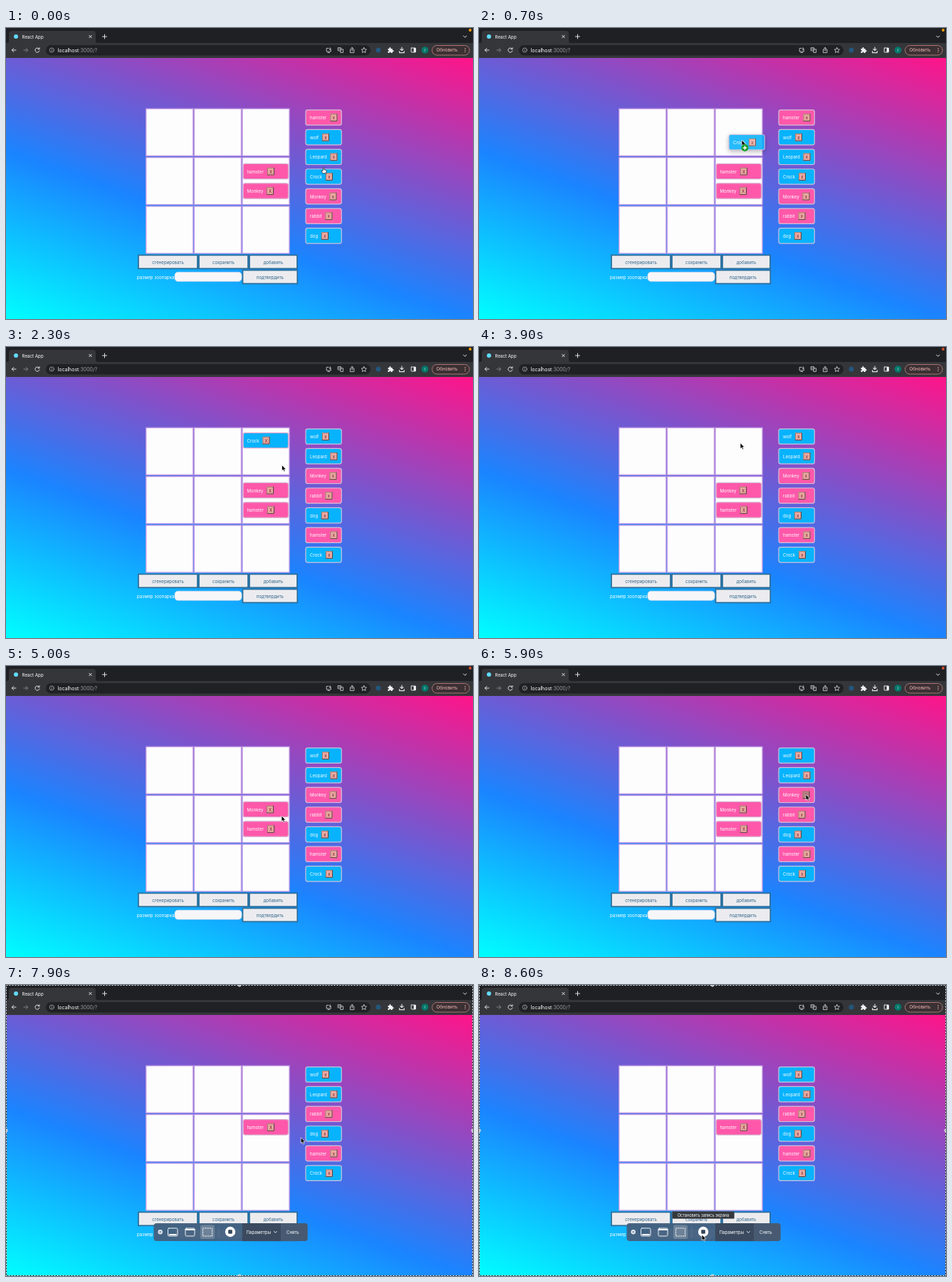
Write an HTML page that moves like this. It is 656 px wide and 408 px high and loops after 8700 ms.

```html
<!DOCTYPE html>
<html lang="ru">
<head>
<meta charset="utf-8">
<title>React App</title>
<style>
html, body { margin: 0; width: 100%; height: 100%; overflow: hidden; background: #35363a; }
#stage { position: relative; width: 656px; height: 408px; overflow: hidden; }
#page { position: absolute; left: 0; top: 42px; width: 656px; height: 366px;
  background: linear-gradient(20deg, #00ffff 0%, #1a84ff 39%, #ff1489 100%); }
svg { position: absolute; left: 0; top: 0; display: block; }
text { font-family: Inter, sans-serif; font-size: 6.1px; fill: #fff; dominant-baseline: central; }
.mid { text-anchor: middle; }
.line { fill: none; stroke: #dfe1e5; stroke-width: 1; stroke-linecap: round; stroke-linejoin: round; }
</style>
</head>
<body>
<div id="stage">
<div id="page"></div>
<svg width="656" height="408" viewBox="0 0 656 408">
  <g id="chrome">
    <rect width="656" height="42" fill="#35363a"/>
    <rect width="656" height="21" fill="#1f2023"/>
    <path d="M1 21Q4 21 4 18V8Q4 4 8 4H122Q126 4 126 8V18Q126 21 129 21Z" fill="#35363a"/>
    <circle cx="14" cy="12" r="3" fill="#61dafb"/>
    <text x="22.5" y="12" style="font-size:6.2px">React App</text>
    <path class="line" d="M116.8 10.3l3.4 3.4m0-3.4l-3.4 3.4M135.5 12h6m-3-3v6M642.5 11l2.2 2.2 2.2-2.2"/>
    <path class="line" d="M14 31H8.3m2.6-2.6L8.3 31l2.6 2.6"/>
    <path class="line" style="stroke:#7d8085" d="M25 31h5.7m-2.6-2.6l2.6 2.6-2.6 2.6"/>
    <path class="line" d="M46.6 29.3A3.1 3.1 0 1 0 47 32M47 27.7v2h-2"/>
    <rect x="56" y="24" width="456" height="14.5" rx="7.2" fill="#202124"/>
    <g class="line" style="stroke:#b9bcc1;stroke-width:.7">
      <circle cx="64.3" cy="31" r="3.1"/>
      <path d="M64.3 30.8v1.7M64.3 29.2v.1"/>
    </g>
    <text x="72.5" y="31" style="font-size:7px">localhost<tspan fill="#9aa0a6">:3000/?</tspan></text>
    <g class="line" style="stroke:#c6c9ce;stroke-width:.9">
      <path d="M453 28.4h-2.8v4.6h6.2v-2M452 34.5h2.6M455.3 27.6v3m-1.3-1.2l1.3 1.2 1.3-1.2"/>
      <path d="M466.6 27.6h4v4.2h-4zM470.8 29.8h2.8v4.6h-3.8v-2.4M467.6 29.6h2"/>
      <path d="M485 30h-1.5v4.6h5.4V30h-1.5M486.2 32.3v-5m-1.4 1.3l1.4-1.4 1.4 1.4"/>
      <path d="M502.8 27.4l1.1 2.4 2.6.3-1.9 1.8.5 2.6-2.3-1.3-2.3 1.3.5-2.6-1.9-1.8 2.6-.3z"/>
    </g>
    <circle cx="523" cy="31" r="3.5" fill="#24567c"/>
    <path d="M536.5 29h2q-.6-2 1-2t1 2h2.3v2.2q1.8-.6 1.8 1t-1.8 1V35h-2q0-1.5-1.2-1.5T538.500 35h-2v-2.200q1.400 0 1.400-1t-1.400-1z" fill="#f1f3f4"/>
    <path class="line" style="stroke-width:1.2" d="M556 27v4.600m-2.100-2l2.100 2 2.100-2M552.700 32.500v2.200h6.600v-2.200"/>
    <rect class="line" x="569.200" y="28" width="6.200" height="6" rx=".5"/>
    <rect x="572.700" y="28" width="2.800" height="6" fill="#f1f3f4"/>
    <circle cx="588.500" cy="31" r="4.800" fill="#00796b"/>
    <text class="mid" x="588.500" y="31.200" style="font-size:5px">I</text>
    <rect x="598.500" y="24.500" width="52.500" height="13.500" rx="6.700" fill="#3b3033" stroke="#c98480" stroke-width=".8"/>
    <text x="604.500" y="31.200" style="font-size:6.300px;fill:#f2b8b5">Обновить</text>
    <g fill="#f2b8b5"><circle cx="645" cy="28.800" r=".7"/><circle cx="645" cy="31.200" r=".7"/><circle cx="645" cy="33.600" r=".7"/></g>
    <circle id="dot" cx="652" cy="3" r="1.900"/>
  </g>
  <g id="board"></g>
  <g id="cards"></g>
  <g id="recorder">
    <rect x=".5" y=".5" width="655" height="407" fill="none" stroke="#222"/>
    <rect x=".5" y=".5" width="655" height="407" fill="none" stroke="#e4e4e4" stroke-dasharray="2 2"/>
    <g fill="#b8b8b8" stroke="#fff" stroke-width=".6">
      <circle cx="328" cy="0" r="2.200"/><circle cx="328" cy="408" r="2.200"/>
      <circle cx="0" cy="204" r="2.200"/><circle cx="656" cy="204" r="2.200"/>
    </g>
    <rect x="207.500" y="334" width="216" height="25" rx="4" fill="#43607f" fill-opacity=".96"/>
    <path d="M332 334H386V359H332z" fill="#3b4a5f"/>
    <path d="M386 334H419.500Q423.500 334 423.500 338V355Q423.500 359 419.500 359H386z" fill="#485a72"/>
    <rect x="273" y="336.500" width="20" height="19.500" rx="2.500" fill="#6d8299"/>
    <circle cx="216.700" cy="346.300" r="3.200" fill="#e3e8ee"/>
    <path d="M215.500 345.100l2.400 2.400m0-2.400l-2.400 2.400" stroke="#43607f" stroke-width=".9"/>
    <g class="line" style="stroke:#f0f3f6">
      <rect x="227.500" y="341" width="13.500" height="11" rx="1.500"/>
      <path d="M229.500 350h9.500" style="stroke-width:1.800"/>
      <rect x="252" y="341" width="13" height="11" rx="1.500"/>
      <path d="M252.500 343h12" style="stroke-width:2"/>
      <rect x="276.500" y="341" width="13" height="11" stroke-dasharray="1.500 1.700"/>
      <path d="M376.500 345.500l1.900 1.900 1.900-1.900"/>
      <path d="M299 339v15" style="stroke:#637b94;stroke-width:.7"/>
    </g>
    <circle cx="315" cy="346" r="7.200" fill="#fff"/>
    <rect x="312.200" y="343.200" width="5.600" height="5.600" rx="1" fill="#34465a"/>
    <text x="337.500" y="346.500">Параметры</text>
    <text x="394" y="346.500">Снять</text>
    <g id="tip">
      <rect x="271.500" y="317.500" width="87" height="10" rx="1" fill="#35383d" stroke="#5d6168" stroke-width=".5"/>
      <text class="mid" x="315" y="322.600" style="font-size:5.500px">Остановить запись экрана</text>
    </g>
  </g>
  <g id="cursor">
    <path id="arrow" d="M0 0V8L1.900 6.400 3.200 9.300 4.600 8.700 3.400 5.900H5.900Z" fill="#000" stroke="#fff" stroke-width=".7"/>
    <path id="hand" d="M-.800 4V.200Q0-.800.800.200V2.600L3.600 3.300Q4.400 3.600 4.200 4.600L3.400 7.800H-.800L-3 5Q-2.600 3.800-1.600 4.600Z" fill="#fff" stroke="#111" stroke-width=".7"/>
    <g id="plus">
      <circle cx="4.500" cy="11" r="5" fill="#1f9d2b"/>
      <path d="M4.500 8.300v5.400M1.800 11h5.400" stroke="#fff" stroke-width="1.400"/>
    </g>
  </g>
</svg>
</div>
<script>
const LOOP = 8700, STEP = 100;
const GRAB = 200, DROP = 900, CLEAR = 3700, REMOVE = 6000, RECORD = 7900;
const $ = id => document.getElementById(id);
const PINK = '#ff58aa', BLUE = '#08b3fd';

// colour and offset from the label to the button's centre
const animals = {
  hamster: [PINK, 33.5], wolf: [BLUE, 22], Leopard: [BLUE, 33.5], Crock: [BLUE, 27],
  Monkey: [PINK, 32.5], rabbit: [PINK, 26.5], dog: [BLUE, 21]
};
const before = ['hamster', 'wolf', 'Leopard', 'Crock', 'Monkey', 'rabbit', 'dog'];
const after = ['wolf', 'Leopard', 'Monkey', 'rabbit', 'dog', 'hamster', 'Crock'];

// time, x, y of the pointer's tip
const path = [
  [0, 446, 196], [200, 439, 205], [700, 369, 157], [900, 368, 153], [1600, 380, 160],
  [2300, 387.5, 165.5], [2800, 385, 160], [3600, 367, 134.5], [4100, 367, 134.5],
  [4400, 400, 185], [4600, 425, 213], [4800, 390, 212], [5000, 387, 210],
  [5400, 425, 200], [5800, 459, 180], [6400, 459, 180], [6600, 450, 228],
  [6800, 426, 198], [7800, 426, 198], [8300, 313, 350], [8700, 313, 350]
];

function pointer(t) {
  let i = 1;
  while (path[i][0] < t) i++;
  const [t0, x0, y0] = path[i - 1], [t1, x1, y1] = path[i];
  const p = (t - t0) / (t1 - t0), k = p * p * (3 - 2 * p);
  return [x0 + (x1 - x0) * k, y0 + (y1 - y0) * k];
}

const box = (x, y, w, h, attrs) => `<rect x="${x}" y="${y}" width="${w}" height="${h}" ${attrs}/>`;

function closeButton(x, y, label, pressed) {
  const l = x - 5, t = y - 5.3, r = x + 5, b = y + 5.3;
  return box(l, t, 10, 10.6, `fill="${pressed ? '#b98085' : '#eaa9a2'}"`) +
    `<path d="M${l + .5} ${b - .5}V${t + .5}H${r - .5}" fill="none" stroke="#a27a68"/>` +
    `<path d="M${r - .5} ${t}V${b - .5}H${l}" fill="none" stroke="#573f3a"/>` +
    `<text class="mid" x="${x}" y="${y}" style="fill:#6b2026">${label}</text>`;
}

function card(name, x, y, w, inCell, pressed) {
  const [color, gap] = animals[name], tx = x + (inCell ? 5.3 : 6);
  return box(x, y, w, 21.4, `rx="2.800" fill="${color}" stroke="${inCell ? '#d9a9cb' : '#cdbfdc'}" stroke-width="1.200"`) +
    `<text x="${tx}" y="${y + 10.8}">${name}</text>` +
    closeButton(tx + gap, y + 10.8, inCell ? 'X' : 'x', pressed);
}

const listCard = (name, i, pressed) => card(name, 421, 114.8 + 27.65 * i, 50.3, false, pressed);
const cellCard = (name, y) => card(name, 333.2, y, 63.3, true);

function drawBoard() {
  let s = '';
  for (let i = 0; i < 9; i++) {
    s += box(196.8 + i % 3 * 67.6, 113.2 + Math.floor(i / 3) * 68.4, 66, 66,
      'fill="#fdfdfe" stroke="#c49be3" stroke-width="1.300"');
  }
  const button = (x, y, w, label) => box(x, y, w, 18.8, 'fill="#ececef" stroke="#2c6c96" stroke-width="1.700"') +
    `<text class="mid" x="${x + w / 2}" y="${y + 9.5}" style="fill:#2e6389">${label}</text>`;
  s += button(186, 318.5, 83, 'сгенерировать') + button(271, 318.5, 69, 'сохранить') +
    button(342, 318.5, 67, 'добавить') + button(332.5, 339.6, 76.8, 'подтвердить') +
    '<text x="184" y="349.200" style="font-size:6.200px">размер зоопарка</text>' +
    box(237, 342.3, 94, 13, 'rx="4.500" fill="#f7f7f9" stroke="#cfd6e4" stroke-width=".7"');
  $('board').innerHTML = s;
}

function drawCards(t, x, y) {
  const moved = t >= DROP, removed = t >= REMOVE;
  const list = (moved ? after : before).filter(n => !removed || n !== 'Monkey');
  let s = list.map((n, i) => listCard(n, i, n === 'Monkey' && t >= 5900 && !removed)).join('');
  if (moved && t < CLEAR) s += cellCard('Crock', 120.3);
  if (removed) {
    s += cellCard('hamster', 188.7);
  } else {
    s += cellCard(moved ? 'Monkey' : 'hamster', 190.3) + cellCard(moved ? 'hamster' : 'Monkey', 217.8);
  }
  if (t > GRAB && t < DROP) {
    s += `<g opacity=".88" style="filter:drop-shadow(0 2px 3px rgba(0,0,0,.3))">${card('Crock', x - 18, y - 7.5, 50.3)}</g>`;
  }
  $('cards').innerHTML = s;
}

const show = (id, on) => $(id).style.display = on ? '' : 'none';

function draw(t) {
  const [x, y] = pointer(t);
  const dragging = t > GRAB && t < DROP;
  const hand = t <= GRAB || (t >= 6500 && t < RECORD);
  drawCards(t, x, y);
  $('cursor').setAttribute('transform', `translate(${x} ${y})`);
  show('hand', hand);
  show('arrow', !hand);
  show('plus', dragging && x < 398);
  $('dot').setAttribute('fill', t < 2800 ? '#ff9f0a' : '#d9532f');
  show('dot', t < RECORD);
  show('recorder', t >= RECORD);
  show('tip', t >= 8400);
}

let last = -1;
function tick() {
  const t = Math.floor(performance.now() % LOOP / STEP) * STEP;
  if (t !== last) draw(last = t);
  requestAnimationFrame(tick);
}

drawBoard();
tick();
</script>
</body>
</html>
```
